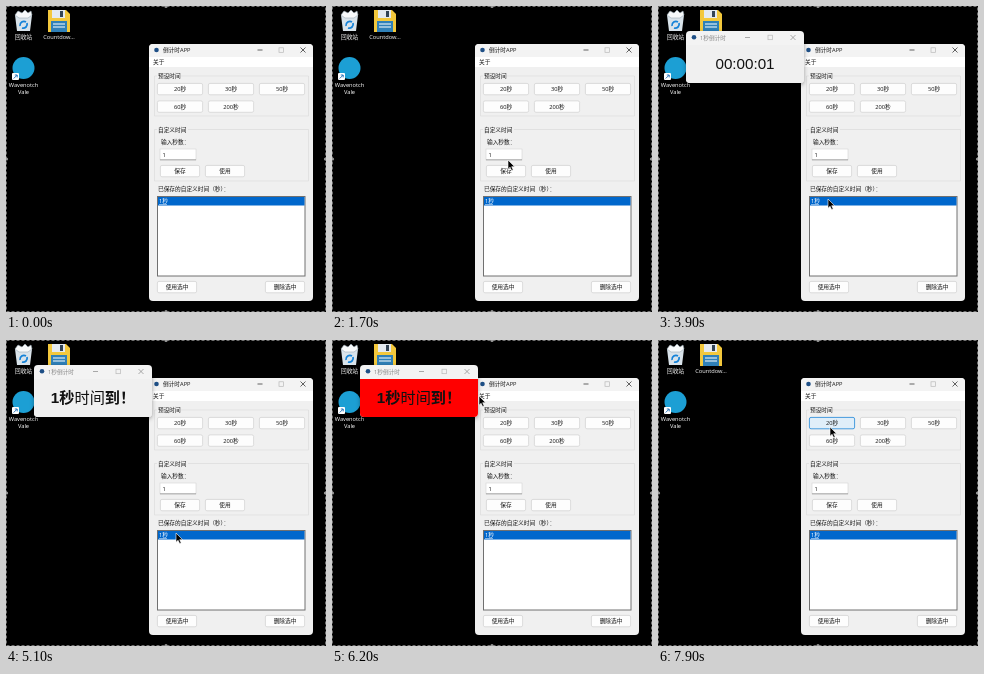
Animation of 320 by 306 pixels, one loop 8000 ms. Source, as an HTML page:

```html
<!DOCTYPE html>
<html lang="zh-CN">
<head>
<meta charset="utf-8">
<title>倒计时</title>
<style>
html, body { margin: 0; width: 100%; height: 100%; overflow: hidden; background: #000; }
svg { display: block; width: 100vw; height: 100vh; }
text { font-family: "Open Sans", "Noto Sans CJK SC", "Noto Sans CJK", sans-serif; font-size: 5.7px; fill: #111; }
.desk text { fill: #fff; text-anchor: middle; }
.big text { font: 15.2px "Liberation Sans", "Noto Sans CJK SC", "Noto Sans CJK", sans-serif; text-anchor: middle; }
.b { font-weight: 700; }
.mid { text-anchor: middle; }
.button rect { fill: #fdfdfd; stroke: #d0d0d0; stroke-width: .7; }
.button.hover rect { fill: #e0eef9; stroke: #0078d4; }
.group { fill: none; stroke: #dcdcdc; stroke-width: .7; }
.glyph { fill: none; stroke: #222; stroke-width: .7; }
.dim { stroke: #b8b8b8; }
</style>
</head>
<body>
<svg viewBox="0 0 320 306">
  <defs>
    <filter id="shadow" x="-10%" y="-10%" width="120%" height="125%">
      <feDropShadow dx="0" dy="1.5" stdDeviation="2" flood-opacity=".35"/>
    </filter>
  </defs>
  <rect width="320" height="306"/>

  <g class="desk">
    <path d="M9 9 26 9 24 25 11 25Z" fill="#d9e3ea"/>
    <path d="M9 9 12 5 16 7 19 4 22 7 25 5 26 9 22 12 13 12Z" fill="#f7f9fa" stroke="#9aa9b4" stroke-width=".6"/>
    <path d="M14 20a4 4 0 0 1 6-4M21 17a4 4 0 0 1-5 5" fill="none" stroke="#1683d8" stroke-width="1.8"/>
    <text x="17.5" y="33">回收站</text>

    <path d="M42 4H60L64 8V26H42Z" fill="#f3c83c"/>
    <path d="M46 4H59V12H46Z" fill="#e4eaf0"/>
    <path d="M54 5H57V11H54Z" fill="#345"/>
    <path d="M45 15H61V26H45Z" fill="#2f80b8"/>
    <path d="M47 18H59M47 21H59" stroke="#fff"/>
    <text x="53" y="33">Countdow...</text>

    <circle cx="17.5" cy="62" r="11" fill="#1c9fd4"/>
    <rect x="6" y="67" width="7" height="7" rx="1" fill="#fff"/>
    <path d="M7.7 72.5 11 69.2M8.8 69H11.2V71.4" fill="none" stroke="#1769b5" stroke-width=".9"/>
    <text x="17.5" y="81">Wavenotch</text>
    <text x="17.5" y="88">Vale</text>
  </g>

  <g id="main">
    <rect x="143" y="38" width="164" height="257" rx="4" fill="#f0f0f0"/>
    <path d="M143 51V42a4 4 0 0 1 4-4H303a4 4 0 0 1 4 4V51Z" fill="#f3f3f3"/>
    <rect x="143" y="51" width="164" height="10" fill="#fff"/>
    <circle cx="150.5" cy="44" r="2.3" fill="#1e4f86"/>
    <text x="157" y="46.3">倒计时APP</text>
    <path class="glyph" d="M251.5 44H256.5M294.5 41.5 299.5 46.5M299.5 41.5 294.5 46.5"/>
    <rect class="glyph dim" x="273" y="41.8" width="4.5" height="4.5"/>
    <text x="147" y="58.3">关于</text>

    <path class="group" d="M151 70H148.5V110H302.5V70H175M151 123.5H148.5V175H302.5V123.5H182"/>
    <text x="152" y="72.2">预设时间</text>
    <text x="152" y="125.7">自定义时间</text>
    <text x="155" y="138">输入秒数：</text>
    <rect x="154" y="143" width="36" height="11" fill="#fff" stroke="#d4d4d4" stroke-width=".6"/>
    <path d="M154 153.8H190" stroke="#888" stroke-width=".7"/>
    <text x="156.5" y="150.8">1</text>
    <text x="152" y="185.2">已保存的自定义时间（秒）：</text>
    <rect x="151.5" y="190.5" width="147.5" height="79.5" fill="#fff" stroke="#707070" stroke-width="1"/>
    <rect x="152" y="191" width="146.5" height="8.5" fill="#0067cc"/>
    <text x="153" y="197.3" style="fill:#fff">1秒</text>
    <path d="M153 198.5H161" stroke="#fff" stroke-width=".5"/>
    <g id="buttons"></g>
  </g>

  <g id="popup">
    <g filter="url(#shadow)">
      <rect x="28" y="25" width="118" height="52" rx="4" fill="#f3f3f3"/>
      <path id="panel" d="M28 39H146V73a4 4 0 0 1-4 4H32a4 4 0 0 1-4-4Z"/>
    </g>
    <circle cx="36" cy="31.3" r="2.3" fill="#1e4f86"/>
    <text x="42" y="33.5" style="fill:#858585">1秒倒计时</text>
    <path class="glyph" style="stroke:#888" d="M87 31.5H92M132.5 29 137.5 34M137.5 29 132.5 34"/>
    <rect class="glyph dim" x="110" y="29.2" width="4.5" height="4.5"/>
    <g class="big">
      <text id="clock" x="87" y="63.3">00:00:01</text>
      <text id="done" x="87" y="63.3"><tspan class="b">1秒</tspan><tspan>时间</tspan><tspan class="b">到！</tspan></text>
    </g>
  </g>

  <rect x=".5" y=".5" width="319" height="305" fill="none" stroke="#8c8c8c" stroke-width=".8" stroke-dasharray="3 2"/>
  <g fill="#999">
    <circle cx="160" cy=".5" r="1.6"/><circle cx="160" cy="305.5" r="1.6"/>
    <circle cx=".5" cy="153" r="1.6"/><circle cx="319.5" cy="153" r="1.6"/>
  </g>

  <path id="cursor" d="M0 0V9.2L2.1 7.3 3.6 10.6 5.2 9.9 3.7 6.7H6.6Z" stroke="#fff" stroke-width=".6"/>
</svg>
<script>
const LOOP = 8000;
const OPEN = 3200, UP = 4200, CLOSE = 6900, BLINK = 500;
const $ = id => document.getElementById(id);

// left, top, width, label
const buttons = [
  [151, 77, 46, '20秒'], [202, 77, 46, '30秒'], [253, 77, 46, '50秒'],
  [151, 94.5, 46, '60秒'], [202, 94.5, 46, '200秒'],
  [154, 159, 40, '保存'], [199, 159, 40, '使用'],
  [151, 275, 40, '使用选中'], [259, 275, 40, '删除选中']
].map(([x, y, w, label]) => {
  const el = document.createElementNS('http://www.w3.org/2000/svg', 'g');
  el.setAttribute('class', 'button');
  el.innerHTML = `<rect x="${x + .4}" y="${y + .4}" width="${w - .8}" height="11.4" rx="1.6"/>
    <text class="mid" x="${x + w / 2}" y="${y + 8.2}">${label}</text>`;
  $('buttons').append(el);
  return { el, x, y, w };
});

// time, x, y
const path = [
  [0, 181, 174], [600, 181, 174], [1400, 176, 154], [1800, 176, 154],
  [2500, 170, 193], [5400, 170, 193], [6200, 147, 56], [6700, 135, 31],
  [7000, 135, 31], [7700, 172, 87], [LOOP, 172, 87]
];

function pointerAt(t) {
  const i = path.findIndex(p => p[0] > t);
  const [t0, x0, y0] = path[i - 1], [t1, x1, y1] = path[i];
  const k = (t - t0) / (t1 - t0), e = k * k * (3 - 2 * k);
  return [x0 + (x1 - x0) * e, y0 + (y1 - y0) * e];
}

const show = (id, on) => $(id).setAttribute('visibility', on ? 'visible' : 'hidden');

function draw(now) {
  const t = Math.floor(now % LOOP / 100) * 100;
  const [x, y] = pointerAt(t);
  const open = t >= OPEN && t < CLOSE, up = t >= UP;
  const red = up && Math.floor((t - UP) / BLINK) % 2 === 0;

  show('popup', open);
  show('clock', open && !up);
  show('done', open && up);
  $('panel').setAttribute('fill', red ? '#f00' : '#f0f0f0');

  show('cursor', t >= 100);
  $('cursor').setAttribute('transform', `translate(${x} ${y})`);
  for (const b of buttons) {
    const over = x > b.x && x < b.x + b.w && y > b.y && y < b.y + 12;
    b.el.classList.toggle('hover', over);
  }
  requestAnimationFrame(draw);
}
requestAnimationFrame(draw);
</script>
</body>
</html>
```
